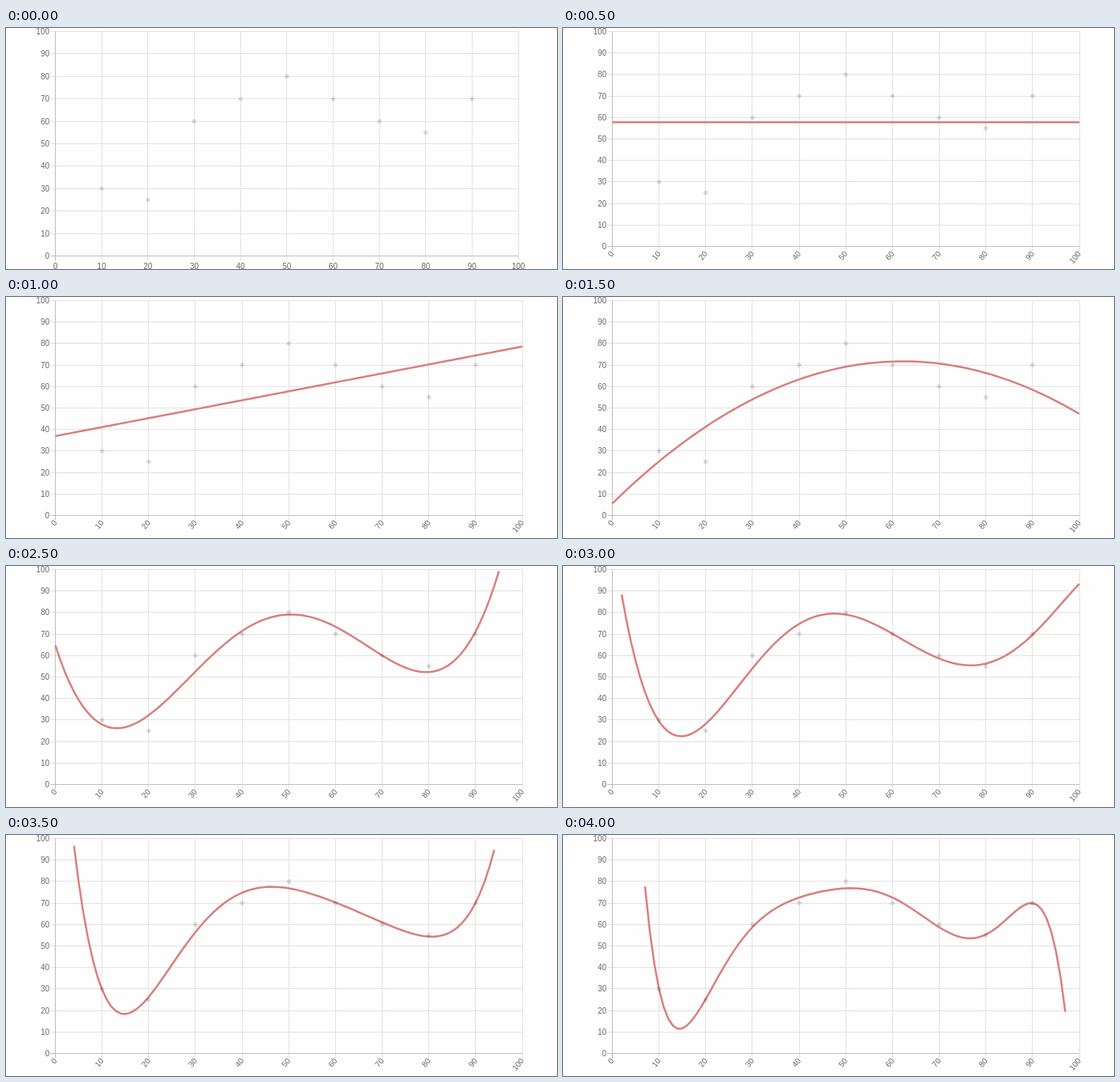
Write an HTML page that moves like this. It is 698 by 305 pixels and loops after 4.5 s.

```html
<!DOCTYPE html>
<html lang="en">
<head>
<meta charset="utf-8">
<title>Polynomial fits</title>
<style>
  html, body { margin: 0; width: 100%; height: 100%; overflow: hidden; background: #fefefe; }
  svg { display: block; width: 698px; height: 305px; }
  .step { visibility: hidden; animation: show 4.5s step-end infinite; }
  @keyframes show {
    0% { visibility: visible; }
    11.1111%, 100% { visibility: hidden; }
  }
  text { font: 10px "Liberation Sans", Arial, sans-serif; fill: #666; }
  .grid { stroke: #e2e2e2; }
  .axis { stroke: #bdbdbd; }
  .dot { fill: #000; fill-opacity: .13; }
  .fit { fill: none; stroke: #d97f7d; stroke-width: 2.5; stroke-linejoin: round; }
</style>
</head>
<body>
<svg id="chart" viewBox="0 0 698 305"></svg>
<script>
const points = [[10, 30], [20, 25], [30, 60], [40, 70], [50, 80], [60, 70], [70, 60], [80, 55], [90, 70]];
const ticks = Array.from({ length: 11 }, (_, i) => i * 10);
const left = 62.5, top_ = 4.5, tickLength = 6;
const STEPS = 9, STEP_SECONDS = 0.5;

// Least-squares polynomial; x is normalised to keep the system well conditioned.
function fitPolynomial(degree) {
  const n = degree + 1;
  const norm = x => (x - 50) / 40;
  const rows = Array.from({ length: n }, (_, r) =>
    Array.from({ length: n + 1 }, (_, c) =>
      points.reduce((sum, [x, y]) =>
        sum + norm(x) ** r * (c < n ? norm(x) ** c : y), 0)));
  for (let p = 0; p < n; p++) {
    let best = p;
    for (let r = p + 1; r < n; r++)
      if (Math.abs(rows[r][p]) > Math.abs(rows[best][p])) best = r;
    [rows[p], rows[best]] = [rows[best], rows[p]];
    for (let r = 0; r < n; r++) {
      if (r === p) continue;
      const k = rows[r][p] / rows[p][p];
      for (let c = p; c <= n; c++) rows[r][c] -= k * rows[p][c];
    }
  }
  const coefficients = rows.map((row, i) => row[n] / row[i]);
  return x => coefficients.reduceRight((sum, a) => sum * norm(x) + a, 0);
}

const line = (x1, y1, x2, y2, cls) =>
  `<line x1="${x1}" y1="${y1}" x2="${x2}" y2="${y2}" class="${cls}"/>`;

function drawChart(right, bottom, rotated, degree) {
  const px = x => left + (right - left) * x / 100;
  const py = y => bottom - (bottom - top_) * y / 100;
  const snap = v => Math.floor(v) + 0.5;
  let grid = '', axes = '', labels = '';

  for (const v of ticks) {
    const x = snap(px(v)), y = snap(py(v)), cls = v ? 'grid' : 'axis';
    const lines = line(x, top_, x, bottom + tickLength, cls) +
                  line(left - tickLength, y, right, y, cls);
    if (v) grid += lines; else axes += lines;
    labels += `<text x="55" y="${py(v) + 3.5}" text-anchor="end">${v}</text>`;
    labels += rotated
      ? `<text transform="translate(${px(v)} ${bottom + 7.2}) rotate(-50)" y="3.5" text-anchor="end">${v}</text>`
      : `<text x="${px(v)}" y="${bottom + 16.5}" text-anchor="middle">${v}</text>`;
  }

  let fit = '';
  if (degree >= 0) {
    const f = fitPolynomial(degree);
    const path = Array.from({ length: 101 }, (_, x) => [x, f(x)])
      .filter(([, y]) => y >= 0 && y <= 100)
      .map(([x, y]) => `${px(x).toFixed(2)},${py(y).toFixed(2)}`);
    fit = `<polyline class="fit" points="${path.join(' ')}"/>`;
  }

  const dots = points.map(([x, y]) =>
    `<circle class="dot" cx="${px(x)}" cy="${py(y)}" r="2.8"/>`).join('');
  return grid + axes + labels + fit + dots;
}

let markup = '';
for (let i = 0; i < STEPS; i++) {
  const delay = (i - STEPS) * STEP_SECONDS;
  const chart = i ? drawChart(654, 276.5, true, i - 1) : drawChart(649, 288.5, false, -1);
  markup += `<g class="step" style="animation-delay:${delay}s">${chart}</g>`;
}
document.getElementById('chart').innerHTML = markup;
</script>
</body>
</html>
```
